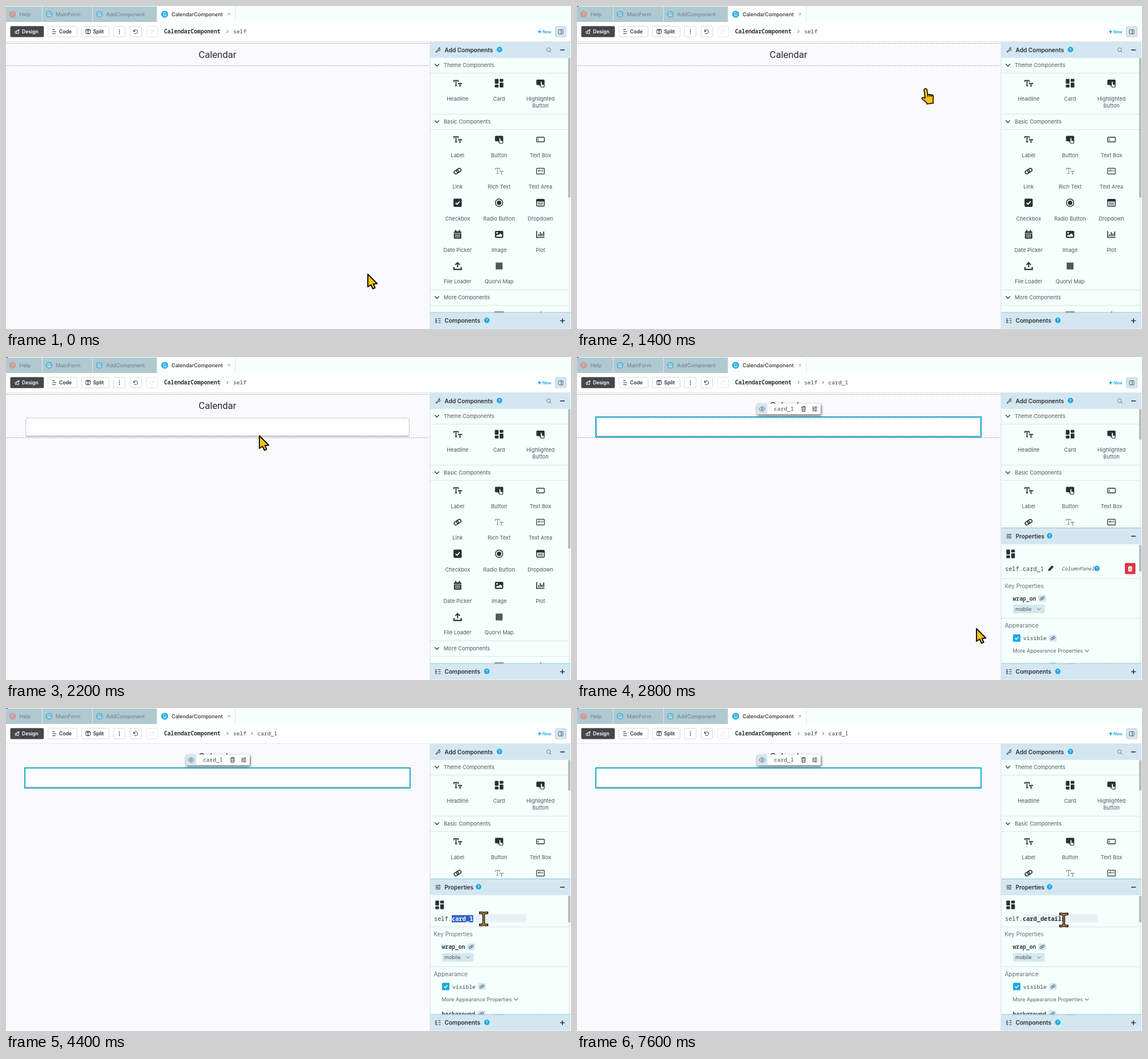
Write an HTML page that moves like this. It is 990x566 px and loops after 8000 ms.

```html
<!DOCTYPE html>
<html lang="en">
<head>
<meta charset="utf-8">
<title>Component editor</title>
<style>
html, body { margin: 0; width: 100%; height: 100%; overflow: hidden; background: #fafafc; }
svg { display: block; width: 990px; height: 566px; }
text { white-space: pre; }
</style>
</head>
<body>
<svg id="stage" viewBox="0 0 990 566"></svg>
<script>
const INK = '#2b3034', TEXT = '#4f565a', BLUE = '#1ba8e4', HEAD = '#d4e7f1', MINT = '#f5fffc', LINE = '#d9e4e5';
const SANS = "Inter, 'Open Sans', sans-serif", MONO = "'Noto Sans Mono', 'DejaVu Sans Mono', monospace";

// Markup helpers; text is placed by the middle of its capitals.
const text = (x, y, s, size = 9.2, fill = TEXT, more = '', font = SANS) =>
  `<text x="${x}" y="${y + size * .36}" font-size="${size}" fill="${fill}" font-family="${font}" ${more}>${s}</text>`;
const mono = (x, y, s, size = 9.7, fill = '#3b4246', more = '') => text(x, y, s, size, fill, more, MONO);
const rect = (x, y, w, h, fill, r = 0, more = '') =>
  `<rect x="${x}" y="${y}" width="${w}" height="${h}" rx="${r}" fill="${fill}" ${more}/>`;
const path = (d, stroke = INK, width = 1.2, fill = 'none') =>
  `<path d="${d}" stroke="${stroke}" stroke-width="${width}" fill="${fill}"/>`;
const dot = (x, y, r, fill) => `<circle cx="${x}" cy="${y}" r="${r}" fill="${fill}"/>`;
const at = (x, y, s, more = '') => `<g transform="translate(${x} ${y}) ${more}">${s}</g>`;
const group = (id, s, more = '') => `<g id="${id}" ${more}>${s}</g>`;
const rule = (y, x = 743, w = 242, color = LINE) => rect(x, y, w, 1, color);
const bold = 'font-weight="600"', mid = 'text-anchor="middle"';
const chevron = (x, y, color = INK, size = 1) => at(x, y, path('M-3.7-2L0 2L3.7-2', color), `scale(${size})`);
const help = (x, y) => dot(x, y, 4.8, BLUE) + text(x, y, '?', 6.8, '#fff', `${bold} ${mid}`);

const finger = 'M-2 8V1.5a2 2 0 0 1 4 0V6l4 1q1.5.5 1 2L6 13H0L-4 8.5q1-1.5 2-.5z';
const chain = (color, width) => at(0, 0, [-6.6, -1.6].map(x =>
  rect(x, -2.9, 8.2, 5.8, 'none', 2.9, `stroke="${color}" stroke-width="${width}"`)).join(''), 'rotate(-32)');
const bigT = 'M-6.5-2.5V-5H1v2.5M-2.8-5V4.2M-4.5 4.2H-1M1.5 1.5V0H7v1.5M4.2 0V5M3 5h2.6';
const sliders = 'M-4.5-3h9M-4.5 0h9M-4.5 3h9M2-4.2v2.4M-2-1.2v2.4M1.5 1.8v2.4';
const icons = {
  type: path(bigT, INK, 1.7),
  rich: path(bigT, '#777d80', 1),
  card: rect(-7.5, -7.5, 6.5, 8.5, INK, 1) + rect(1, -7.5, 6.5, 5, INK, 1) +
    rect(-7.5, 2.6, 6.5, 5, INK, 1) + rect(1, -.9, 6.5, 8.5, INK, 1),
  button: rect(-7.2, -6.5, 14.4, 9.5, INK, 1.5) + at(1.5, -3, path(finger, INK, 1.6, MINT), 'scale(.75)'),
  box: rect(-6.8, -4, 13.6, 8, 'none', 1, `stroke="${INK}" stroke-width="1.3"`) + path('M-4-1.5v3.5'),
  link: chain(INK, 1.6),
  area: rect(-6.8, -5, 13.6, 10, 'none', 1, `stroke="${INK}" stroke-width="1.2"`) + text(-5, -1, 'abc', 4.3, INK, bold) + path('M4-3v4', INK, .8),
  check: rect(-7.2, -7.2, 14.4, 14.4, INK, 2) + path('M-3.5 0L-1 2.6L3.6-2.5', '#fff', 1.8),
  radio: `<circle r="6.5" fill="none" stroke="${INK}" stroke-width="1.4"/>` + dot(0, 0, 3.9, INK),
  drop: rect(-6.7, -6, 13.4, 12, 'none', 1.5, `stroke="${INK}" stroke-width="1.5"`) + rect(-6.7, -6, 13.4, 4, INK, 1) + path('M-4.5.5h9M-4.5 3.2h9'),
  date: rect(-6.5, -5.5, 13, 13, INK, 1.5) + path('M-3.2-8v4M3.2-8v4', INK, 1.8) +
    path('M-6.5-2h13', MINT, 1) + path('M-4 1.3h8M-4 4.4h8', MINT, 1.8).replace('fill', 'stroke-dasharray="2 1" fill'),
  image: rect(-7.3, -6.2, 14.6, 12.4, INK, 1.8) + dot(-3.5, -2.6, 1.5, MINT) + path('M-5.2 4V2.5L-2.5 0l1.6 1.5L2.3-2 5.2 1.2V4z', 'none', 0, MINT),
  plot: path('M-6.7-6V5.3H7', INK, 1.6) + path('M-3.2 3V0M-.2 3V-4M2.7 3V-1.5M5.7 3V-5', INK, 1.8),
  load: path('M0 2.5V-5M-4-2L0-6L4-2', INK, 2) + path('M-6.3 2V6H6.3V2', INK, 2.4),
  map: rect(-6, -6, 12, 12, '#53585b')
};

const item = (col, y, icon, label, second) => {
  const x = [791.3, 864, 936.5][col];
  return at(x, y, icons[icon]) + text(x, y + 27.5, label, 9.2, TEXT, mid) +
    (second ? text(x, y + 39.5, second, 9.2, TEXT, mid) : '');
};
const section = (y, name) => chevron(755, y) + text(767, y, name, 9.25) + rule(y + 13.5);
const header = (y, name, icon, helpX, plus) => rect(743, y - 14, 246, 28, HEAD) + at(757, y, icon) +
  text(768.5, y, name, 10.1, INK, bold) + help(helpX, y - .7) +
  path(`M971 ${y}h8` + (plus ? `M975 ${y - 4}v8` : ''), INK, 1.6);

const doc = path('M-2.2-3H1L2.5-1.3V3H-2.2zM-.8 0H1M-.8 1.5H1', '#fff', .8);
const tab = (x, w, name, color, icon) => rect(x, 1, w, 27, '#b0c9d1') + rect(x + w, 1, 1, 27, '#d9e8eb') +
  dot(x + 11.5, 14.5, 6, color) + at(x + 11.5, 14.5, icon) + text(x + 23.5, 14.5, name, 9.1, '#667f8a');
const frame = (x, w, more = '') => rect(x + .5, 35.5, w, 18.5, '#fff', 2, `stroke="#d3dbdd" ${more}`);
const turn = 'M-3.4-3.5v3h3M-3.2-.8a3.4 3.4 0 1 1 .8 3.2';
const step = x => path(`M${x} 42.2l2.4 2.4-2.4 2.4`, '#4a5155', 1);

const topBar = rect(0, 0, 990, 28, MINT) + rect(0, 28, 990, 34, '#fdfffe') + rect(0, 62, 990, 1, '#e1e5e7') +
  tab(0, 63, 'Help', '#c99c99', text(0, 0, '?', 7, '#e8d9d8', mid)) +
  tab(64, 87, 'MainForm', '#63b5d4', doc) + tab(152, 112.5, 'AddComponent', '#63b5d4', doc) +
  rect(265, 1, 136, 28, '#fdfffe') + rect(401, 1, 1, 27, '#dce6e8') + dot(278, 14.5, 6, BLUE) + at(278, 14.5, doc) +
  text(290, 14.5, 'CalendarComponent', 9.1, INK, 'font-weight="500"') + path('M388.5 12l4.5 4.5m0-4.5l-4.5 4.5', '#777', .8) +
  rect(7.5, 35.2, 58.8, 19.3, '#444648', 2) + at(19, 45, path('M-4.5 1L4-4L2.5 4L-.5 2L-2 4V1.5L3-3', '#fff', 1)) + text(28, 45, 'Design', 8.5, '#fff', bold) +
  frame(73, 51) + path('M81 41.5h4.5M81 45h7M81 48.5h6', INK, 1) + text(93, 45, 'Code', 8.7, INK, bold) +
  frame(132, 48) + rect(140, 41, 7.5, 7.5, 'none', 1, `stroke="${INK}"`) + path('M143.7 41v7.5M140 42h7.5', INK, 1.2) + text(152.5, 45, 'Split', 8.8, INK, bold) +
  frame(188, 20) + [41.8, 45, 48.2].map(y => dot(198.7, y, .9, INK)).join('') +
  frame(217, 20) + at(227, 45, path(turn, INK, 1)) +
  frame(246, 19, 'opacity=".6"') + at(255.5, 45, path(turn, '#e4e9ea', 1), 'scale(-1 1)') +
  mono(277, 44.7, 'CalendarComponent', 9.7, INK, bold) + step(387) + mono(398, 44.7, 'self') +
  path('M935 41l1.1 2.9 2.9 1.1-2.9 1.1-1.1 2.9-1.1-2.9-2.9-1.1 2.9-1.1z', 'none', 0, BLUE) + text(940, 45, 'New', 7.2, BLUE, bold) +
  rect(962.5, 36, 19, 18, HEAD, 2, 'stroke="#bfd4de"') + rect(968, 41.5, 8, 7.5, 'none', 1, 'stroke="#53636b"') + path('M973 41.5v7.5', '#53636b');

const palette = section(103.5, 'Theme Components') + group('hover', rect(829.5, 121, 69, 64, HEAD, 2)) +
  item(0, 135.5, 'type', 'Headline') + item(1, 135.2, 'card', 'Card') + item(2, 135.5, 'button', 'Highlighted', 'Button') +
  rule(189) + section(202.5, 'Basic Components') +
  [['type', 'Label'], ['button', 'Button'], ['box', 'Text Box'], ['link', 'Link'], ['rich', 'Rich Text'], ['area', 'Text Area'],
   ['check', 'Checkbox'], ['radio', 'Radio Button'], ['drop', 'Dropdown'], ['date', 'Date Picker'], ['image', 'Image'], ['plot', 'Plot'],
   ['load', 'File Loader'], ['map', 'Quorvi Map']].map(([icon, label], i) => item(i % 3, 234 + 55.4 * Math.floor(i / 3), icon, label)).join('') +
  rule(497) + section(510.5, 'More Components') + rect(856, 535, 16, 3, '#858b8d') + rect(936, 535, 2, 3, '#858b8d');

const badge = (x, y) => rect(x - 6.8, y - 6, 13.6, 12, HEAD, 2) + at(x, y, chain('#5a6e78', 1.5), 'scale(.62)');
const pencil = path('M-4.5 4.5L-3.7 1L2-4.7Q4.7-5 4.7-2L-1 3.7z', 'none', 0, INK);
const bin = (c, fill) => path('M-4-3h8M-1.5-3v-1.3h3V-3', c, 1) + path('M-3-2.5L-2.6 4.2h5.2L3-2.5', c, 1, fill) +
  path('M-1-1v3.5M1-1v3.5', fill ? '#dc3545' : c, .8);

const properties = rect(743, 299, 246, 238, MINT) + at(759.8, 345, icons.card) +
  group('viewing', mono(750, 371, 'self.card_1', 10.3) + at(830, 370.5, pencil) +
    mono(849, 370.7, 'ColumnPanel', 8.7, TEXT, 'font-style="italic"') + help(911, 370.5) +
    rect(960, 361, 18.5, 19.5, '#dc3545', 2) + at(969.2, 371, bin('#fff', '#fff'))) +
  group('editing', mono(750, 369.7, 'self.', 10.3) + rect(781, 361.5, 131, 14, '#e9f1f5') +
    group('selection', rect(781, 363, 37.5, 12.5, '#2f62c9')) + group('field', mono(781, 369.7, '', 10.3, INK, bold)) +
    group('caret', rect(0, 363, 1, 12.5, '#111'))) +
  group('fields', rule(387.7) + text(749.5, 401, 'Key Properties', 9.9, '#687073') + mono(763.5, 423, 'wrap_on', 9.75, '#3b4246', bold) + badge(815, 423) +
    rect(764, 434, 55.5, 15, HEAD, 2) + text(768, 441.5, 'mobile', 9) + chevron(809.5, 441.7, '#5a6266', .8) +
    rule(457.5) + text(749.5, 470.5, 'Appearance', 10.3, '#687073') +
    rect(764, 486, 13, 13, BLUE, 1.5) + path('M767.5 492.5l2.2 2.4 4-4.4', '#fff', 1.5) +
    mono(782, 492.5, 'visible', 9.75) + badge(834, 492.5) +
    text(763.5, 514.8, 'More Appearance Properties', 9, '#5f676b') + chevron(893.5, 515, '#5f676b', .9) +
    mono(763.5, 541, 'background', 9.75, '#3b4246', bold) + badge(833, 540.5)) +
  rect(743, 299, 246, 1, '#8fc4d4') + header(314, 'Properties', path(sliders, INK, 1), 828) +
  rect(985, 328, 4, 209, '#eef4f3') + rect(985, 329, 4, 47, '#b5babc', 2);

const panel = rect(743, 63, 247, 503, MINT) + palette + rect(985, 90, 4, 447, '#eef4f3') +
  rect(985, 91, 4, 245, '#b5babc', 2, 'id="thumb"') +
  header(77, 'Add Components', path('M-4 3L1-1Q0-4 3.5-4.2L2-2.2 4-.7Q3.5 2 1 1L-3 4.5z', INK, 1), 864.7) +
  path('M953 79l2.7 2.7M954 76.5a3.3 3.3 0 1 1-6.6 0a3.3 3.3 0 1 1 6.6 0', '#6b777c', .9) +
  group('properties', properties) + header(551.5, 'Components', path('M-4-4v7.5h3M-4-3.5h2M-4 0h3M0-3.5h4.5M1 0h3.5M1 3.5h3.5', INK, 1), 842.5, true) +
  rect(743, 536.5, 246, 1, '#8fc4d4') + rect(742.5, 63, 1, 503, '#d5e0e5');

const dash = (y, id = '') => `<path ${id} d="M1 ${y}H742" stroke="#a3a6a9" stroke-width="1" stroke-dasharray="2.4 1.6"/>`;
const form = text(370.5, 85, 'Calendar', 16.6, '#26292c', mid, 'Roboto, sans-serif') +
  group('guides', dash(65.5) + dash(0, 'id="bottom"')) +
  group('card', rect(35, 137, 671, 2.5, '#a0a4a7', 2) + rect(34.5, 107, 672, 31.3, '#fdfefd', 2) +
    group('outline', rect(34.5, 107, 672, 31.5, 'none', 2, 'stroke="#a3a6a9" stroke-dasharray="2.4 1.6"'))) +
  group('selected', rect(33, 105, 675, 35.3, 'none', 0, 'stroke="#1eaacb" stroke-width="2"') +
    rect(315, 81.5, 112, 19, '#fff', 2, 'style="filter:drop-shadow(1px 2px 2px #000a)"') + rect(315, 81.5, 18.5, 19, HEAD, 2) +
    path('M319 91q5.3-8 10.6 0q-5.3 8-10.6 0z', '#4c5b63', .9) + `<circle cx="324.3" cy="91" r="1.6" fill="none" stroke="#4c5b63" stroke-width=".9"/>` +
    mono(345, 91, 'card_1') + at(397, 91, bin(INK, 'none').replaceAll('#dc3545', INK)) + at(416.5, 91, path(sliders, INK, 1)));

const YELLOW = '#ffc010';
const pointers = {
  arrow: path('M0 0V22L5.5 18.5L8.8 25.5L12.6 23.9L9.8 17.2L16.3 16.5z', '#111', 2, YELLOW),
  hand: at(0, 0, path('M-3 17V3a2.6 2.6 0 0 1 5.2 0V11l7 1.7q3 1 2.3 4L10 23v4.5H-1.5V25L-9 17q1.5-4 6 0zM2.2 11v4M5.5 12v3.5M8.6 13v3', '#111', 1.7, YELLOW), 'rotate(-8)'),
  beam: path('M-8-10.5h5q3 0 3 3v15q0 3-3 3h-5M8-10.5H3q-3 0-3 3v15q0 3 3 3h5', '#111', 4.4) +
    path('M-6.5-10.5h4q2.5 0 2.5 3v15q0 3-2.5 3h-4M6.5-10.5h-4q-2.5 0-2.5 3v15q0 3 2.5 3h4', '#e0a83a', 1.4)
};

stage.innerHTML = form + topBar + group('crumb', step(430) + mono(440.5, 44.7, 'card_1')) + panel +
  group('speck', rect(0, 0, 3, 1, '#444')) +
  group('pointer', Object.entries(pointers).map(([id, s]) => group(id, s, 'stroke-linejoin="round"')).join(''));

const $ = id => document.getElementById(id);
const show = (id, on) => $(id).style.display = on ? '' : 'none';
const route = [[0, 634, 470], [200, 690, 385], [400, 800, 215], [600, 849, 132], [800, 845, 133], [1200, 690, 142],
  [1800, 452, 149], [2000, 448, 150], [2400, 440, 126], [2600, 560, 290], [2800, 700, 476], [3400, 826, 374],
  [4000, 833, 368], [4400, 837, 369], [4800, 845, 370], [5000, 853, 371], [8000, 853, 371]];
const typing = [[0, 'card_1'], [5200, 'card_'], [6000, 'card_d'], [6200, 'card_de'], [6400, 'card_deta'],
  [6800, 'card_detai'], [7000, 'card_detail'], [7200, 'card_details']];

function position(t) {
  const i = route.findIndex(k => k[0] > t), [a, x, y] = route[i - 1], [b, u, v] = route[i], p = (t - a) / (b - a);
  return [x + (u - x) * p, y + (v - y) * p];
}

function draw(now) {
  const t = Math.floor(now % 8000 / 200) * 200;
  const [x, y] = position(t), over = x < 743, dropped = t >= 1800, picked = t >= 2400, edit = t >= 4000;
  const kind = edit ? 'beam' : t >= 600 && t < 1800 || t >= 3400 ? 'hand' : 'arrow';
  const selecting = t < 5200, value = typing.findLast(k => k[0] <= t)[1];
  $('pointer').setAttribute('transform', `translate(${x} ${y + (kind == 'beam' ? .5 : 0)})`);
  for (const id in pointers) show(id, id == kind);
  show('guides', over);
  $('bottom').setAttribute('transform', `translate(0 ${dropped ? 141.5 : 104.5})`);
  show('outline', over);
  show('hover', x > 829 && x < 899 && y > 120 && y < 186);
  show('speck', t >= 1000);
  show('card', dropped);
  for (const id of ['selected', 'crumb', 'properties']) show(id, picked);
  $('thumb').setAttribute('height', picked ? 54 : 245);
  show('viewing', !edit);
  show('editing', edit);
  $('fields').setAttribute('transform', `translate(0 ${edit ? -4.5 : 0})`);
  show('selection', selecting);
  const label = $('field').firstChild;
  label.textContent = value;
  label.setAttribute('fill', selecting ? '#fff' : INK);
  show('caret', !selecting && t != 5600 && t < 7600);
  $('caret').setAttribute('transform', `translate(${781 + value.length * 6.18} 0)`);
}

const start = performance.now();
function tick() {
  draw(performance.now() - start);
  requestAnimationFrame(tick);
}
tick();
</script>
</body>
</html>
```
